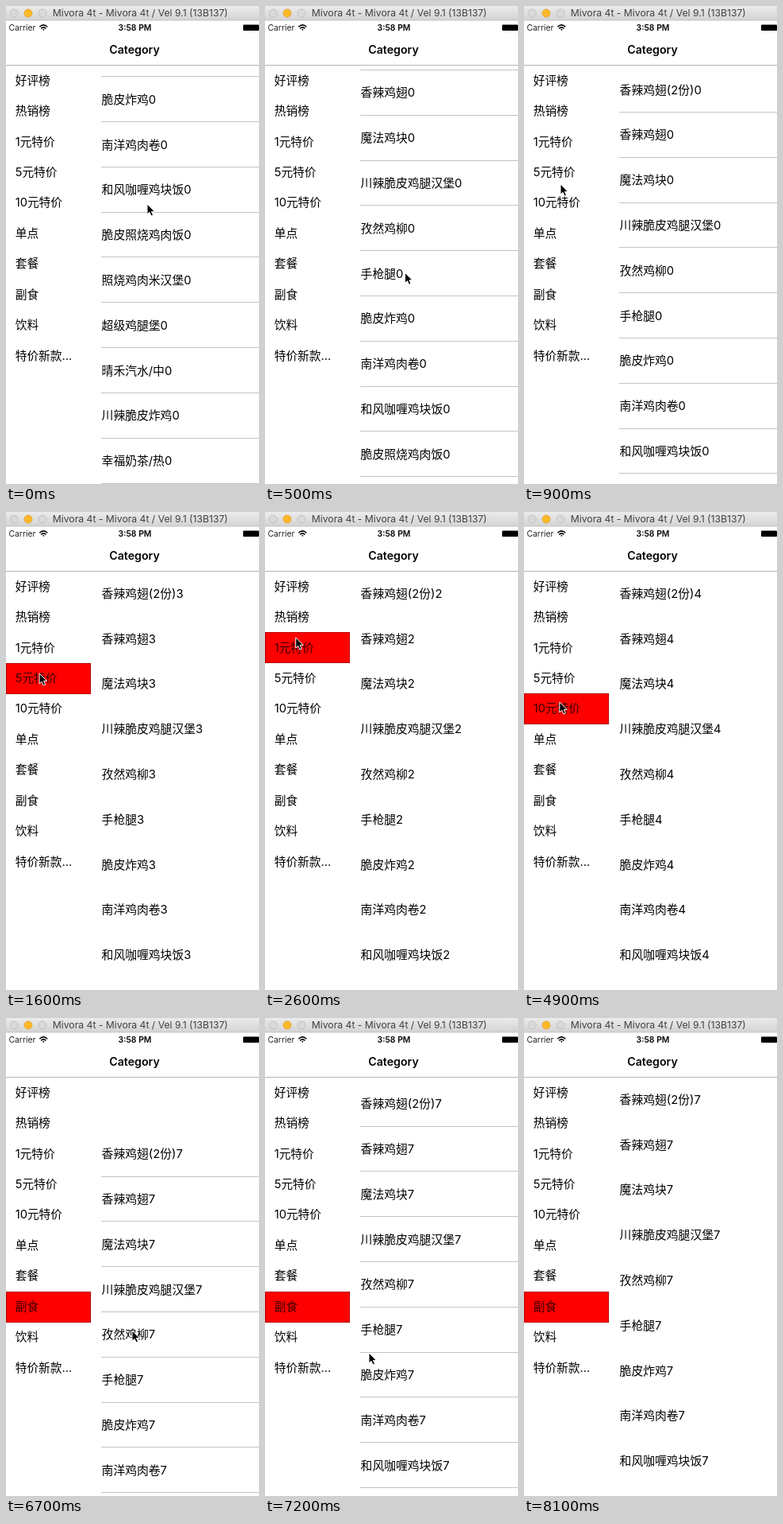
Write an HTML page that moves like this. It is 319 by 601 pixels and loops after 8.2 s.

```html
<!DOCTYPE html>
<html lang="zh-CN">
<head>
<meta charset="utf-8">
<style>
html, body { margin: 0; width: 100%; height: 100%; overflow: hidden; background: #fff; }
svg { display: block; font-family: Inter, "Noto Sans CJK SC", "Noto Sans CJK", sans-serif; }
#menu { font-size: 14.7px; }
#list { font-size: 14.8px; }
</style>
</head>
<body>
<svg width="319" height="601" viewBox="0 0 319 601">
  <defs>
    <linearGradient id="bar" x2="0" y2="1">
      <stop stop-color="#ebebeb"/><stop offset="1" stop-color="#d3d3d3"/>
    </linearGradient>
    <clipPath id="body"><rect y="75" width="319" height="526"/></clipPath>
  </defs>
  <rect width="319" height="601" fill="#fff"/>

  <g clip-path="url(#body)">
    <g id="list"></g>
    <rect id="mark" x=".5" y=".5" width="106" height="38" fill="#f00" stroke="#b80000"/>
    <g id="menu"></g>
  </g>
  <path d="M0 74.5H319" stroke="#b4b4b4"/>

  <rect width="319" height="18" fill="url(#bar)"/>
  <path d="M0 18H319" stroke="#bdbdbd" stroke-width=".8"/>
  <g stroke-width=".8">
    <circle cx="10.3" cy="9" r="5" fill="#d9d9d9" stroke="#bcbcbc"/>
    <circle cx="28" cy="9" r="5" fill="#fdb827" stroke="#e0a032"/>
    <circle cx="46" cy="9" r="5" fill="#d9d9d9" stroke="#bcbcbc"/>
  </g>
  <text x="169.3" y="13.4" font-size="12.2" text-anchor="middle" fill="#404040">Mivora 4t - Mivora 4t / Vel 9.1 (13B137)</text>

  <text x="3.4" y="31.2" font-size="10.4" fill="#222">Carrier</text>
  <g fill="none" stroke="#000" stroke-width="1.5">
    <path d="M42.3 26.2Q47.3 21.6 52.3 26.2M44.2 28.4Q47.3 25.4 50.4 28.4"/>
    <path d="M46 29.5L47.3 31L48.6 29.5Q47.3 28.5 46 29.5Z" fill="#000" stroke="none"/>
  </g>
  <text x="162.5" y="31.2" font-size="10.4" font-weight="600" text-anchor="middle">3:58 PM</text>
  <rect x="299" y="23.5" width="20" height="7.5" rx="1"/>
  <text x="162" y="60.3" font-size="14.2" font-weight="600" text-anchor="middle">Category</text>

  <path id="cursor" d="M0 0V13L3 10.3L5.1 15L7.5 14L5.4 9.4H9.4Z"
    fill="#000" stroke="#fff" stroke-width="1" stroke-linejoin="round"/>
</svg>
<script>
const LOOP = 8200, STEP = 100, ROW = 56.8, CELL = 38.45;
const menu = '好评榜 热销榜 1元特价 5元特价 10元特价 单点 套餐 副食 饮料 特价新款...'.split(' ');
const foods = ('香辣鸡翅(2份) 香辣鸡翅 魔法鸡块 川辣脆皮鸡腿汉堡 孜然鸡柳 手枪腿 脆皮炸鸡 南洋鸡肉卷 ' +
  '和风咖喱鸡块饭 脆皮照烧鸡肉饭 照烧鸡肉米汉堡 超级鸡腿堡 晴禾汽水/中 川辣脆皮炸鸡 幸福奶茶/热').split(' ');

// Taps walk up from row 3 to 0, then quickly down from row 4 to 7
const taps = Array.from({ length: 8 }, (_, i) => i < 4
  ? { row: 3 - i, time: 1300 + 900 * i }
  : { row: i, time: 4800 + 470 * (i - 4) });

// Pointer stops [time, x, y]: drag, taps, pull, exit
const stops = [
  [0, 178, 249], [400, 182, 340], [900, 46, 224],
  ...taps.flatMap(({ row, time }, i) => {
    const spot = [34 + 2.7 * row, 95 + 36 * row];
    return [[i ? taps[i - 1].time + 500 : time, ...spot], [time + 300, ...spot]];
  }),
  [6600, 160, 345], [6700, 159, 393], [7200, 131, 421], [7900, 131, 421], [8000, 33, 248]
];

const $ = id => document.getElementById(id);
const clamp = v => Math.min(1, Math.max(0, v));

function add(parent, tag, attrs, text = '') {
  const el = document.createElementNS('http://www.w3.org/2000/svg', tag);
  for (const k in attrs) el.setAttribute(k, attrs[k]);
  el.textContent = text;
  return parent.appendChild(el);
}

function pointer(t) {
  const i = stops.findIndex(s => s[0] > t);
  if (i < 0) return stops.at(-1).slice(1);
  const [t0, x0, y0] = stops[i - 1], [t1, x1, y1] = stops[i];
  const p = ((t - t0) / (t1 - t0)) ** 2;
  return [x0 + (x1 - x0) * p, y0 + (y1 - y0) * p];
}

// Fling to the top with a slight overshoot, later a pull down and spring back
function scroll(t) {
  const fling = clamp(t / 1100), pull = clamp((t - 6500) / 250), back = clamp((t - 6750) / 700);
  return -325.8 * (1 - fling) ** 2 * Math.cos(2.26 * fling)
    + 72 * Math.sin(pull * Math.PI / 2) * (1 - back) ** 2.5;
}

const labels = menu.map((s, i) => add($('menu'), 'text', { x: 11.7, y: 98.6 + i * CELL }, s));
const rows = foods.map(() => add($('list'), 'text', { x: 120.6 }));
const lines = add($('list'), 'path', { stroke: '#c3c3c3' });

function draw(t) {
  const pick = taps.findLast(tap => tap.time <= t)?.row ?? -1;
  const offset = scroll(t), [x, y] = pointer(t);

  rows.forEach((el, i) => {
    el.textContent = foods[i] + Math.max(pick, 0);
    el.setAttribute('y', 107.7 + i * ROW + offset);
  });
  labels.forEach((el, i) => el.setAttribute('fill', i === pick ? '#380000' : '#000'));
  // separators vanish while the list rests
  lines.setAttribute('d', offset
    ? foods.map((s, i) => `M120 ${Math.floor(130.6 + i * ROW + offset) + .5}h199`).join('') : '');
  $('mark').style.display = pick < 0 ? 'none' : '';
  $('mark').setAttribute('transform', `translate(0 ${Math.round(74.4 + pick * CELL)})`);
  $('cursor').style.display = t < 8100 ? '' : 'none';
  $('cursor').setAttribute('transform', `translate(${x} ${y})`);
}

const start = performance.now();
function tick() {
  const t = (performance.now() - start) % LOOP;
  draw(Math.floor(t / STEP) * STEP);
  requestAnimationFrame(tick);
}
tick();
</script>
</body>
</html>
```
